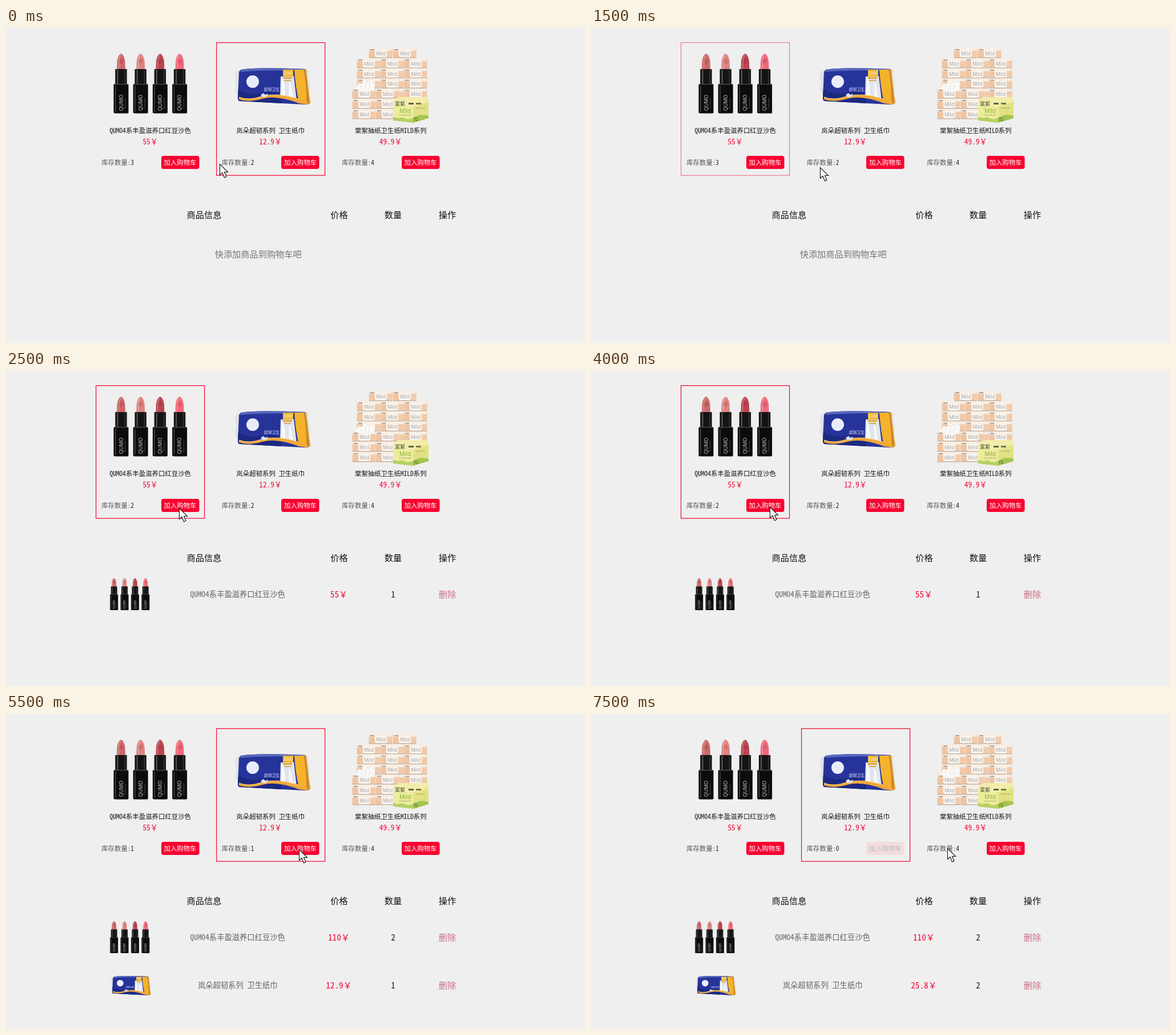
These frames come from a looping animation (1014x552 px, 8000 ms). An HTML page with a canvas:

```html
<!DOCTYPE html>
<html lang="zh-CN">
<head>
<meta charset="utf-8">
<title>购物车</title>
<style>
  html, body { margin: 0; width: 100%; height: 100%; overflow: hidden; background: #efefef; }
  canvas { display: block; }
</style>
</head>
<body>
<canvas id="stage" width="1014" height="552"></canvas>
<script>
const ctx = document.getElementById('stage').getContext('2d');
const LOOP = 8000;
const RED = '#f30533';
const FONT = '"Noto Sans Mono CJK SC", "Noto Sans CJK SC", "Noto Sans CJK", sans-serif';
const SMALL = 11.4, MID = 13.3, BIG = 15.2;

const products = [
  { name: 'QUMO4系丰盈滋养口红豆沙色', price: 55, stock: 3, clicks: [2500, 4500],
    border: [[0, 0], [1500, .5], [2000, 1], [5000, .6], [5500, 0]],
    left: 157, art: lipsticks, thumb: [182, 363, 188, 45, .537] },
  { name: '岚朵超韧系列 卫生纸巾', price: 12.9, stock: 2, clicks: [5500, 6000],
    border: [[0, 1], [500, .1], [1000, 0], [5000, .5], [5500, 1]],
    left: 367.5, art: bluePack, thumb: [184, 459, 402, 70, .53] },
  { name: '棠絮抽纸卫生纸MILD系列', price: 49.9, stock: 4, clicks: [],
    border: [[0, 0]], left: 578, art: tissueStack }
];

const pointer = [
  [0, 374, 238], [500, 323, 287], [1000, 322, 287], [1500, 401, 244], [2000, 303, 240],
  [4000, 313, 238], [4500, 313, 236], [5000, 492, 236], [5500, 513, 237], [7500, 624, 235]
];

// Last key at or before t: values jump, they do not glide.
const held = (keys, t) => keys.filter(k => k[0] <= t).pop();

function rect(x, y, w, h, fill, radius = 0) {
  ctx.fillStyle = fill;
  ctx.beginPath();
  ctx.roundRect(x, y, w, h, radius);
  ctx.fill();
}

function shape(d, fill, stroke, width = 1) {
  const p = new Path2D(d);
  if (fill) { ctx.fillStyle = fill; ctx.fill(p); }
  if (stroke) { ctx.strokeStyle = stroke; ctx.lineWidth = width; ctx.stroke(p); }
}

// Text on a half-width / full-width character grid, centred on y.
function gridText(str, x, y, size, color, centered = true) {
  const chars = [...str];
  const cell = c => c.charCodeAt(0) < 128 ? size / 2 : size;
  if (centered) x -= chars.reduce((sum, c) => sum + cell(c), 0) / 2;
  ctx.font = `${size}px ${FONT}`;
  ctx.fillStyle = color;
  ctx.textAlign = 'center';
  for (const c of chars) {
    ctx.fillText(c, x + cell(c) / 2, y + size * .37);
    x += cell(c);
  }
}

function latin(str, x, y, size, color) {
  ctx.font = `${size}px "Open Sans", sans-serif`;
  ctx.fillStyle = color;
  ctx.textAlign = 'center';
  ctx.fillText(str, x, y);
}

function lipsticks() {
  ['#cd696b', '#de8583', '#ba4650', '#f1697a'].forEach((color, i) => {
    ctx.save();
    ctx.translate(201.5 + i * 34.2, 0);
    rect(-8, 145, 22, 5.5, '#dcdad8', 3);
    shape('M-7.5 73L-7 58C-6 51-3 45.5 0 45C3 45.5 6 51 7 58L7.5 73Z', color);
    shape('M-4 71V57Q-3 50 0 47', null, 'rgba(255,255,255,.2)', 2);
    shape('M-3 57Q0 51 4 56L3 62Q0 64-3 61Z', 'rgba(110,30,40,.18)');
    rect(-10.2, 72, 20.4, 27, '#141414', 1);
    rect(-7, 73, 2, 25, '#5c5a58');
    rect(6, 73, 1.5, 25, '#3a3938');
    rect(-13, 98, 26, 51.5, '#0c0c0c', 2);
    rect(-12.5, 98, 25, 1.2, '#55524f');
    rect(-10.5, 101, 1.5, 46, '#4a4846');
    ctx.rotate(-Math.PI / 2);
    latin('QUMO', -131, 3, 9, '#d4d4d4');
    rect(-142, 7, 20, .8, '#555');
    ctx.restore();
  });
}

function bluePack() {
  shape('M403 77L411 74V119L405 115L402 108L404 98L402 86Z', '#e2e3e8', '#cfd0d6', .6);
  shape('M522 72L530 74L529 84L532 99L531 118L535 131L525 134Z', '#e5dfd2');
  shape('M411 73Q440 68 525 72L532 132Q528 135 521 134L409 128Q406 127 406 123L408 77Z', '#26349a');
  shape('M411 73Q440 68 525 72L523 75Q448 73 411 77Z', '#5968bd');
  shape('M407 106Q423 121 462 111L482 116V132L409 128Q406 127 406 121Z', '#1c2980');
  shape('M481 85L504 84L509 126L480 119Z', '#e0e4ee');
  shape('M483 87Q489 92 489 122L482 120Z', '#f8f8fa');
  shape('M496 94Q501 101 503 124L495 122Z', '#f5f5f7');
  shape('M505 73H525L533 132L525 134L513 130Q507 104 505 73Z', '#f4b32b');
  shape('M521 73L525 72L532 131L526 133Q526 95 521 73Z', '#cf8829');
  shape('M408 121Q424 127 446 120Q480 111 529 130L526 134L513 132Q474 117 449 124Q424 131 408 125Z', '#f0a83a');
  shape('M408 121Q425 128 447 120Q477 112 513 125', null, '#ffd682', 1);
  rect(485, 73, 18, 12, '#eeb633');
  gridText('1000', 494, 79, 8, '#fff8dc');
  rect(485, 86, 16, 3, '#e6a72e');
  rect(487, 91, 12, 2, '#d9ac53');
  gridText('超韧卫生', 465.5, 107.5, 6.8, '#dfe4ff');
  shape('M446 117L451 114L454 117L459 115L456 121L449 121Z', '#dce2f6');
  ctx.fillStyle = '#e9edfb';
  ctx.beginPath();
  ctx.arc(432, 94, 11, 0, Math.PI * 2);
  ctx.fill();
}

function tissuePack(x, y) {
  rect(x, y, 42, 18, '#f1d9c5', 2);
  rect(x + 1, y, 40, 4.5, '#f8eee4', 2);
  shape(`M${x + 1} ${y + 5}H${x + 10}L${x + 13} ${y + 16}H${x + 1}Z`, '#efc5a4');
  shape(`M${x + 33} ${y + 5}H${x + 41}V${y + 16}H${x + 30}Z`, '#f1cbab');
  rect(x + 11, y + 4, 21, 12, '#faf6f2', 3);
  rect(x + 1, y + 16, 40, 1.5, '#c9b8a9');
  rect(x + 3, y + 2, 7, 2, '#a9a099');
  latin('Mild', x + 21.5, y + 12.7, 8.5, '#a19994');
}

function tissueStack() {
  for (const x of [635, 677]) tissuePack(x, 35);
  for (let row = 0; row < 4; row++)
    for (let col = 0; col < 3; col++) tissuePack(614 + col * 41, 53 + row * 17.8);
  for (let row = 0; row < 3; row++)
    for (let col = 0; col < 2; col++) tissuePack(606 + col * 41, 106 + row * 18);
  shape('M613 107L617 96L623 98L628 92L635 96L643 94L646 107L637 110L622 109Z', '#faf9f7');
  shape('M619 99L624 107M630 96L629 108M638 98L635 108', null, '#dedbd7', .8);

  shape('M678 127L687 121L737 121L740 125V158L713 166L678 162Z', '#ecec9c');
  shape('M678 127L687 121L737 121L740 125L714 138L678 137Z', '#f3ecab');
  shape('M713 138L740 130V158L713 166Z', '#e2e184');
  shape('M678 155Q686 160 694 156Q704 163 713 157V166L678 162Z', '#b6d063');
  shape('M713 158Q724 149 740 154V158L713 166Z', '#a3c551');
  gridText('棠絮', 690, 133, 9, '#3f4a2b');
  rect(705, 131, 9, 3, '#5d6641');
  rect(718, 131, 9, 3, '#737a48');
  latin('Mild', 699, 149, 10, '#86ae36');
  rect(688, 152, 22, 1.2, '#b2b876');
  rect(718, 140, 16, 1, '#a3a764');
  gridText('72', 718, 160, 8, '#3e5426');
}

function card(p, t) {
  const mid = p.left + 95.7, sold = p.clicks.filter(c => c <= t).length;
  const left = p.stock - sold;
  p.art();
  gridText(p.name, mid, 180, SMALL, '#111');
  gridText(p.price + '￥', mid, 199, MID, RED);
  gridText('库存数量:', p.left + 10.2, 236, SMALL, '#555', false);
  gridText(String(left), p.left + 64.2, 236, SMALL, '#222');
  rect(Math.floor(p.left + 115), 224, 66.5, 23, left ? '#f70330' : '#f1dddd', 4);
  gridText('加入购物车', p.left + 148, 236, SMALL, left ? '#fff' : '#c2bcbc');

  ctx.globalAlpha = held(p.border, t)[1];
  ctx.strokeStyle = RED;
  ctx.lineWidth = 1.2;
  ctx.strokeRect(Math.round(p.left) + .6, 25.6, 190, 232.6);
  ctx.globalAlpha = 1;
}

function cartRow(p, count, y) {
  const [x, top, fromX, fromY, scale] = p.thumb;
  ctx.save();
  ctx.translate(x, top);
  ctx.scale(scale, scale);
  ctx.translate(-fromX, -fromY);
  p.art();
  ctx.restore();
  gridText(p.name, 405.7, y, MID, '#626262');
  gridText(+(p.price * count).toFixed(1) + '￥', 583, y, BIG, RED);
  gridText(String(count), 678, y, BIG, '#222');
  gridText('删除', 773, y, BIG, '#cd6c85');
}

function cart(t) {
  [['商品信息', 347], ['价格', 583.5], ['数量', 678], ['操作', 773]]
    .forEach(([str, x]) => gridText(str, x, 327, BIG, '#111'));
  let y = 391;
  for (const p of products) {
    const count = p.clicks.filter(c => c <= t).length;
    if (!count) continue;
    cartRow(p, count, y);
    y += 84.5;
  }
  if (y < 400) gridText('快添加商品到购物车吧', 441.7, 396, BIG, '#747474');
}

function arrow(t) {
  const [, x, y] = held(pointer, t);
  ctx.save();
  ctx.translate(x + .5, y + .5);
  shape('M0 0V19L4.5 15L8 23.5L11.5 22L8 14H14Z', '#fff', '#111', 1.1);
  ctx.restore();
}

function draw() {
  const t = performance.now() % LOOP;
  rect(0, 0, 1014, 552, '#efefef');
  products.forEach(p => card(p, t));
  cart(t);
  arrow(t);
  requestAnimationFrame(draw);
}
draw();
</script>
</body>
</html>
```
